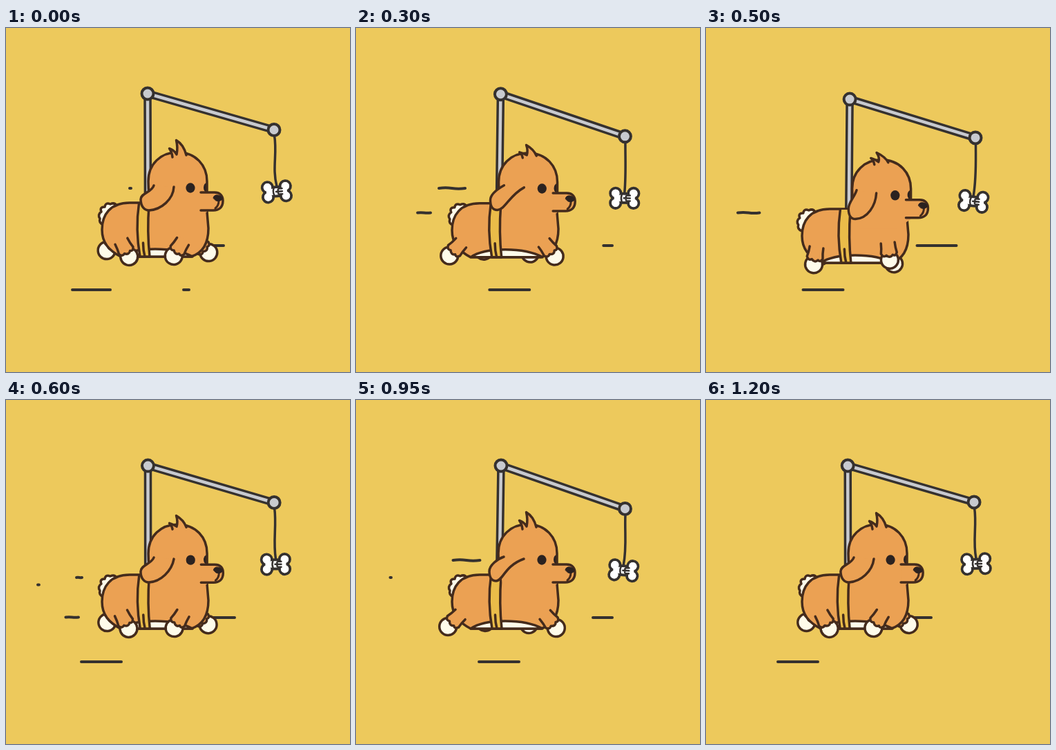
An HTML page with a canvas that plays this animation: 498x498 px, repeating every 1250 ms.

```html
<!DOCTYPE html>
<html lang="en">
<head>
<meta charset="utf-8">
<title>Running dog</title>
<style>
html, body { margin: 0; width: 100%; height: 100%; overflow: hidden; background: #edc95c; }
canvas { display: block; width: 498px; height: 498px; }
</style>
</head>
<body>
<canvas id="stage" width="498" height="498"></canvas>
<script>
const c = document.getElementById('stage').getContext('2d');
const LOOP = 1250, STEP = 50, STRIDE = 164;
const BG = '#edc95c', FUR = '#eba153', BROWN = '#442b1c', DARK = '#35312f',
      BLACK = '#2b2220', CREAM = '#fefbea', STEEL = '#c8cacf', STRAP = '#eabc49';

// Ground covered (px) over time (ms)
const RUN = [[0, 0], [400, 85], [600, 148], [950, 243], [1200, 317], [1250, 328]];

function ground(t) {
  const i = RUN.findIndex(([end]) => t < end);
  const [t0, a] = RUN[i - 1], [t1, b] = RUN[i];
  return a + (b - a) * (t - t0) / (t1 - t0);
}

// One swing per stride, peaking at phase `peak`
const swing = (p, peak) => Math.cos(2 * Math.PI * (p - peak));

// The body sinks twice per stride and lingers at both ends
function sink(p) {
  const s = 1.3 * swing(2 * p, .42);
  return 4.5 * (1 + Math.max(-1, Math.min(1, s)));
}

function poseAt(p) {
  const low = sink(p), reach = (1 - swing(p, 0)) / 2;
  const tipY = 147.5 + .58 * low + 10 * reach;
  return {
    low, reach, tipY,
    mastX: 205 + 5 * reach,
    mastY: 95 + .9 * low,
    tipX: 388 + .12 * low + 1.5 * reach,
    boneX: 389.5 + 3 * swing(p, .1),
    boneY: tipY + 89.3 + .3 * low,
    boneTilt: -.12 * swing(p, .13),
    bend: 3 * swing(p, .05),
    headX: .62 * low,
    headY: 1.2 * low,
    tuft: 162.5 + 2 * sink(p - .04),
    stride: swing(p, -.04)
  };
}

function shape(d, fill, stroke = BROWN, width = 3.5) {
  const path = new Path2D(d);
  if (fill) { c.fillStyle = fill; c.fill(path); }
  if (stroke) { c.strokeStyle = stroke; c.lineWidth = width; c.stroke(path); }
}

function oval(x, y, rx, ry, fill, stroke, width = 3.5) {
  c.beginPath();
  c.ellipse(x, y, rx, ry, 0, 0, 7);
  c.fillStyle = fill;
  c.fill();
  if (stroke) { c.strokeStyle = stroke; c.lineWidth = width; c.stroke(); }
}

function at(x, y, angle, draw) {
  c.save();
  c.translate(x, y);
  c.rotate(angle);
  draw();
  c.restore();
}

// Speed line that shows only between lo and hi
function dash(x, len, y, lo, hi, wavy = false) {
  const a = Math.max(x, lo) + 2, b = Math.min(x + len, hi) - 2;
  if (b < a - 2) return;
  const m = (a + b) / 2, wave = wavy ? (b - a) * .035 : 0;
  shape(`M${a} ${y} Q${(a + m) / 2} ${y - wave} ${m} ${y} T${Math.max(b, a + 1)} ${y}`, null, DARK, 4);
}

function speedLines(u) {
  const v = u % STRIDE;
  for (const back of [0, STRIDE]) {
    dash(255 - v - back + 0, 62, 379, 94, 267);
    dash(420 - v - back, 61, 315, 280, 373);
  }
  for (const begin of [0, 202]) dash(177 - .94 * (u - begin), 43, 232, 118, 183, true);
  dash(147 - .94 * u, 42, 267.5, 44, 110, true);
  dash(248 - u, 46, 257, 48, 112, true);
  dash(225 - .95 * u, 24, 314.5, 58, 107, true);
}

function crane({ low, reach, mastX, mastY, tipX, tipY, bend, boneX, boneY, boneTilt }) {
  const beam = d => {
    shape(d, null, DARK, 11.5);
    shape(d, null, STEEL, 4.5);
  };
  beam(`M${mastX} ${mastY} L${205.5 + 2 * reach} ${262 + low}`);
  beam(`M${mastX} ${mastY} L${tipX} ${tipY}`);
  shape(`M${tipX + .5} ${tipY + 8} C${tipX + 2 + bend} ${tipY + 34}
    ${tipX - bend} ${boneY - 34} ${boneX} ${boneY - 8}`, null, DARK, 3.5);
  oval(mastX, mastY, 8.5, 8.5, STEEL, DARK, 4);
  oval(tipX, tipY, 8.5, 8.5, STEEL, DARK, 4);
  at(boneX, boneY, boneTilt, bone);
}

function bone() {
  const lobes = (r, edge) => {
    for (const x of [-13, 13]) for (const y of [-7, 7]) oval(x, y, r, r, '#fff', edge, 4);
  };
  lobes(7.6, DARK);
  shape('M-9 -6.5 H9 V6.5 H-9 Z', '#fff', DARK, 4);
  lobes(5.8);
  shape('M-15 -4.5 H15 V4.5 H-15 Z', '#fff', null);
  shape('M-4 -5 Q-6 0 -4 5 M-1 0 H8 M3 -4 H8 M3 4 H8 M2 -3 V3', null, DARK, 2.5);
}

function leg(hipX, hipY, x, y) {
  const len = Math.max(20, Math.hypot(x - hipX, y - hipY));
  at(x, y, Math.atan2(y - hipY, x - hipX) - Math.PI / 2, () => {
    oval(0, 0, 12.5, 12.5, CREAM, BROWN);
    const cuff = 'Q-9 -4 -4 -7 Q1 -2 5 -7 Q9 -4 11.5 -10';
    shape(`M-11 ${-len} L-11.5 -10 ${cuff} L11 ${-len} Z`, FUR, null);
    shape(`M-10 -25 Q-10 -17 -11.5 -10 ${cuff} Q10 -17 10 -25`);
  });
}

const rearLeg = (x, y, low) => leg(110 + .32 * x, 309 + low, x, y);
const foreLeg = (x, y, low) => leg(205 + .22 * x, 305 + low, x, y);

function body({ low, reach, stride }) {
  at(-low * .25, low, 0, () => shape(
    'M160 257 Q157 252 151 255 Q144 252 143 259 Q135 259 138 266 Q132 270 136 276 Q134 282 141 285 L158 275 Z', CREAM));
  rearLeg(166 - 21 * stride, 322 + .9 * low, low);
  foreLeg(272 + 22 * stride, 325 + 1.8 * low, low);
  at(0, low, 0, () => {
    shape('M230 253 H179 C151 253 139 270 139 292 C139 311 149 322 166 331 H268 C287 325 293 309 293 290 L291 266', FUR);
    shape('M166 331 Q182 320 216 320 Q250 320 270 331 Z', CREAM);
  });
  rearLeg(156 + 23 * stride, 331 + 1.45 * low - 3 * reach, low);
  foreLeg(266 - 24 * stride, 330 + .65 * low, low);
  at(3 * reach, low, 0, () => {
    const edge = 'M192.5 254 Q187 292 194 331';
    shape(`${edge} H208 Q204 295 207 254 Z`, STRAP, null);
    shape(`${edge} H208 Q204 295 207 256 M198.5 311 Q198.5 322 201 331`);
  });
}

function head({ low, reach, headX, headY, tuft }) {
  at(headX, headY, 0, () => {
    const skull = 'M207 240 Q206 232 206 222 C206 197 224 180 248 180 C275 180 291 199 291 222 V238';
    shape(`${skull} V266 L270 280 H215 Z`, FUR, null);
    c.save();
    c.clip(new Path2D('M206 200 H292 V250 H206 Z'));
    oval(291, 231, 5, 7, BLACK);
    c.restore();
    shape(skull);
    oval(267 + 2 * reach, 231.5, 6.6, 7.2, BLACK);
  });

  // Tuft: base rides on the head, tips lag
  const x = headX * .5, base = 184 + headY, side = 174 + (tuft - 162) * .78;
  shape(`M${241 + x} ${base + 3} Q${240 + x} ${(base + side) / 2} ${236.5 + x * .8} ${side}
    Q${243 + x} ${side + 2} ${247 + x} ${base - 1} Q${249 + x} ${(base + tuft) / 2} ${246.5 + x * .2} ${tuft}
    Q${257 + x} ${tuft + 6} ${261 + x} ${base}`, FUR);

  at(headX + 3 * reach, headY, 0, () => {
    shape('M282 238 H302 C311 238 314 244 314 250 C314 260 308 264 300 264 H282', FUR);
    shape('M308 250 Q308 257 303 261', null, BROWN, 3);
    shape('M300 246 Q301 241 307 242 Q313 243 313 248 Q309 252 304 250 Z', BLACK, BLACK, 1);
  });
  ear(low, reach * (1 - low / 9), reach);
}

// `flick` lifts the ear from a hanging lobe to a thin streaming one
function ear(low, flick, reach) {
  const mix = (a, b) => a + (b - a) * flick;
  const lx = 214 + low * .45, ly = 228 + low * .75 - flick;
  const rx = 243 + low * .4, ry = 230 + low;
  const ox = 195 + 1.25 * low - 2 * flick, oy = 248 + 1.5 * low;
  const bx = 207 + 1.3 * low - 4 * reach, by = 264 + 1.4 * low - 2 * flick;
  shape(`M${lx} ${ly} C${mix(lx - 3, lx - 9)} ${mix(ly + 10, ly + 3)} ${ox} ${oy - 9} ${ox} ${oy}
    C${ox} ${by - 5} ${bx - 6} ${by} ${bx} ${by}
    C${mix(bx + 18, bx + 10)} ${mix(by - 1, by - 1)} ${mix(rx - 1, bx + 12)} ${mix(ry + 18, ry + 10)} ${rx} ${ry}`, FUR);
}

function draw(now) {
  const t = Math.floor(now % LOOP / STEP) * STEP;
  const u = ground(t), pose = poseAt(u % STRIDE / STRIDE);
  c.fillStyle = BG;
  c.fillRect(0, 0, 498, 498);
  c.lineCap = c.lineJoin = 'round';
  speedLines(u);
  crane(pose);
  body(pose);
  head(pose);
}

let start;
function frame(now) {
  start ??= now;
  draw(now - start);
  requestAnimationFrame(frame);
}
draw(0);
requestAnimationFrame(frame);
</script>
</body>
</html>
```
